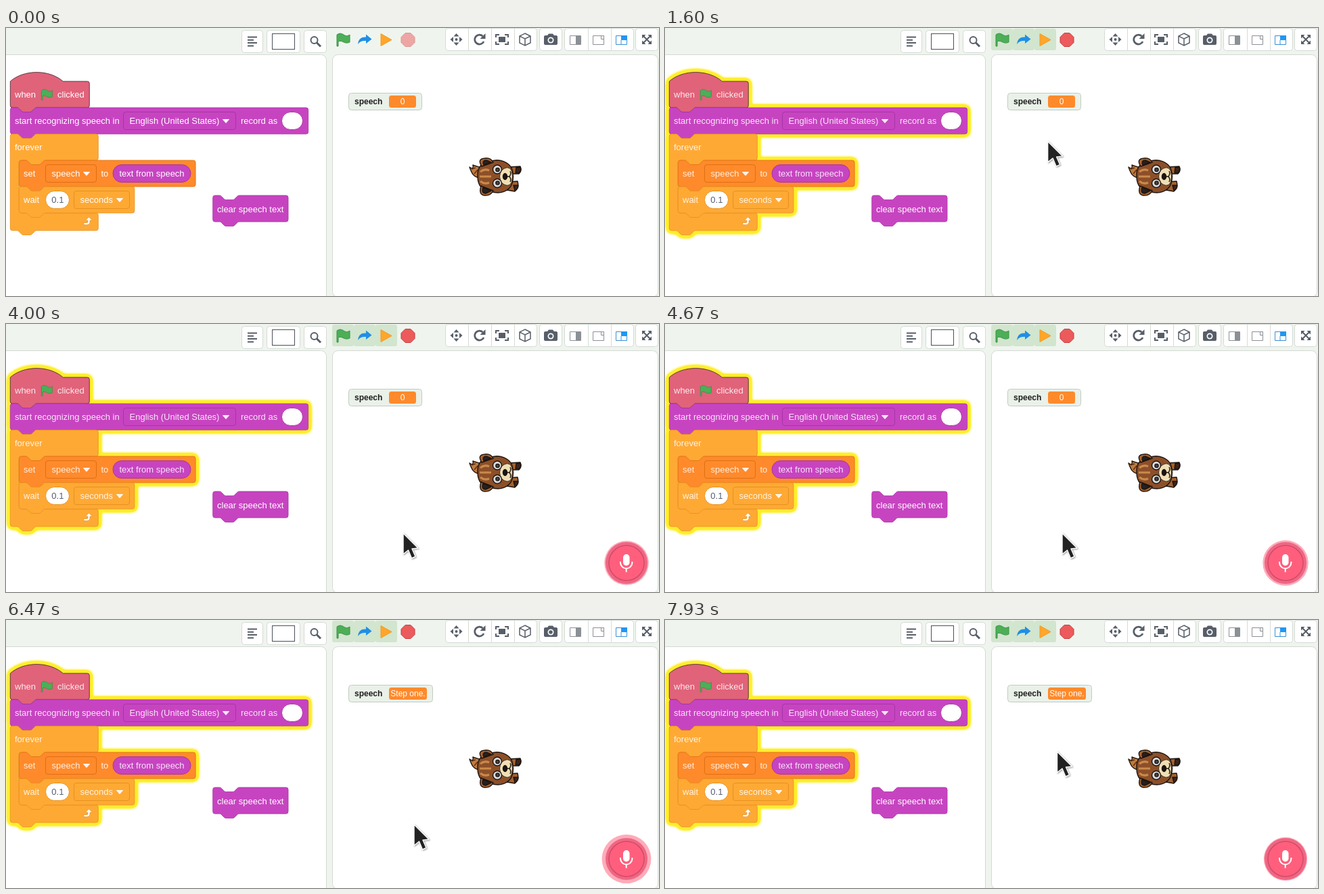
These frames come from a looping animation (965x397 px, 8000 ms). An HTML page:

```html
<!DOCTYPE html>
<html lang="en">
<head>
<meta charset="utf-8">
<title>Speech blocks</title>
<style>
html, body { margin: 0; width: 100%; height: 100%; overflow: hidden; background: #eff5ee; }
svg { display: block; font: 13px "Liberation Sans", Arial, sans-serif; }
.label { fill: #fff; }
.running { filter: url(#glow); }
.running .label { fill-opacity: .86; }
.btn { fill: #fff; stroke: #d5dbd5; }
.icon { fill: none; stroke: #575e68; stroke-width: 2; }
.solid { fill: #575e68; }
.ink { stroke: #1d1410; stroke-width: 1.4; stroke-linejoin: round; }
</style>
</head>
<body>
<svg width="965" height="397" viewBox="0 0 965 397">
  <defs>
    <filter id="glow" filterUnits="userSpaceOnUse" x="-10" y="50" width="480" height="270" color-interpolation-filters="sRGB">
      <feGaussianBlur in="SourceAlpha" stdDeviation="3.4"/>
      <feComponentTransfer result="halo"><feFuncA type="table" tableValues="0 1 1 1 1 1 1 1 1 1 1 1"/></feComponentTransfer>
      <feFlood flood-color="#ffee2b"/>
      <feComposite in2="halo" operator="in"/>
      <feMerge><feMergeNode/><feMergeNode in="SourceGraphic"/></feMerge>
    </filter>
    <path id="flag" d="M1 3C5 0 8 1 11 3S17 5 20 3V14C16 16 13 15 10 13.500S5 12 3 13V20H1Z" fill="#4caf57" stroke="#3c9147"/>
  </defs>

  <rect x="-10" y="39.500" width="483.500" height="380" rx="8" fill="#fff" stroke="#d3d9d3"/>
  <rect x="482.500" y="39.500" width="481" height="359" rx="8" fill="#fff" stroke="#d3d9d3"/>

  <g id="buttons"></g>
  <path class="icon" d="M357 13.500h14M357 17.800h9M357 22.100h14M357 26.400h9"/>
  <rect x="393.500" y="8.500" width="33" height="23" fill="#fff" stroke="#4a4f57"/>
  <circle class="icon" cx="455.500" cy="18" r="5" stroke-width="2.400"/>
  <path class="icon" d="M459 21.500l6 6" style="stroke-width:3"/>

  <g id="cells"></g>
  <use href="#flag" x="488" y="7"/>
  <path d="M520 24C521 16 525 13 532 13.500V9.500L540.500 16.500L532 23V19C526 18.500 523 20 520 24Z" fill="#1f8fe5"/>
  <path d="M554 8.500L570 17.500L554 26.500Z" fill="#ffa62b" stroke="#f39a20" stroke-linejoin="round"/>
  <path id="stop" d="M590 7.500h8l6 6v8l-6 6h-8l-6-6v-8z" fill="#ec5a5c" stroke="#c8393d"/>

  <g class="solid">
    <path d="M665.500 8l4 4.500h-8zM665.500 26l4-4.500h-8zM656.500 17l4.500-4v8zM674.500 17l-4.500-4v8z"/>
    <circle cx="665.500" cy="17" r="2"/>
    <path d="M708.500 8v8h-8z"/>
    <path d="M795 13q0-2 2-2h3l2-2.500h6l2 2.500h3q2 0 2 2v10q0 2-2 2h-16q-2 0-2-2z"/>
    <circle cx="805" cy="18" r="4.500" fill="#fff"/><circle cx="805" cy="18" r="2.800"/>
    <path d="M728 13h10v8h-10z"/>
    <path d="M940 10h5.500l-5.500 5.500zM954 10v5.500l-5.500-5.500zM940 24v-5.500l5.500 5.500zM954 24h-5.500l5.500-5.500z"/>
  </g>
  <g class="icon">
    <path d="M704.500 12A7 7 0 1 0 706 20" stroke-width="2.800"/>
    <path d="M724 14v-4h5M737 10h5v4M742 20v4h-5M729 24h-5v-4"/>
    <path d="M767 8l8 4v10l-8 4l-8-4v-10zM759 12l8 4l8-4M767 16v10" style="stroke-width:1.500"/>
    <path d="M941 11l12 12M953 11l-12 12"/>
  </g>
  <g fill="#fff" stroke="#8b9096">
    <path d="M833.500 11.500h16v13h-16zM867.500 11.500h16v13h-16z"/>
    <path d="M842 12h7.500v12h-7.500z" fill="#8b9096" stroke="none"/>
    <path d="M879.500 11.500h4v5h-4z"/>
    <path d="M901.500 11.500h16v13h-16z" stroke="#3b8fd6"/>
    <path d="M909 11h9v7h-9z" fill="#2196f3" stroke="none"/>
    <path d="M909 18v6" stroke="#3b8fd6"/>
  </g>

  <g id="stack"></g>
  <g id="loose"></g>

  <rect id="monitor" x="506.500" y="96.500" height="25" rx="4" fill="#e9f1e8" stroke="#c3cbc3"/>
  <text x="515" y="113" font-size="12" font-weight="bold" fill="#1e1e1e">speech</text>
  <rect id="slot" x="566" y="100" height="18" rx="3.500" fill="#ff8a2b"/>
  <text id="value" y="113.300" font-size="12" text-anchor="middle" fill="#fff"></text>

  <g id="animal" class="ink">
    <path d="M702 222C690 222 688 214 685 206C689 209 691 208 690 203C696 206 701 204 706 211Z" fill="#c07a3c"/>
    <path d="M688 209l6-2M692 216l5-6" fill="none" stroke="#5b2e14"/>
    <path d="M742 206L760 205Q763 211 758 216L744 216ZM742 228L756 227Q759 236 752 242L740 240Z" fill="#a5622f"/>
    <path d="M754 206.500h6q2 4-2 8h-5zM750 233h7q0 6-5 8z" fill="#3b241a"/>
    <path d="M697 220C696 206 704 198 716 198C728 192 745 199 748 210Q751 220 748 230C744 242 730 247 716 242C704 242 697 233 697 220Z" fill="#8d4f28"/>
    <path d="M703 205Q696 194 707 193Q716 191 720 199ZM702 234Q698 247 707 248Q716 249 720 241Z" fill="#a5622f"/>
    <path d="M706 203Q703 196 710 196L717 199ZM705 236Q702 245 709 245L717 241Z" fill="#262020"/>
    <path d="M701 213Q707 208 714 211M700 220H717M701 227Q707 232 714 229" fill="none" stroke="#c98a4c" stroke-width="3"/>
    <path d="M731 212Q742 202 747 211Q750 220 747 229Q742 238 731 228Q728 220 731 212Z" fill="#f0dfb4" stroke-width=".8"/>
    <circle cx="726" cy="209.500" r="6.500" fill="#d9dadb"/><circle cx="726" cy="230" r="6.500" fill="#d9dadb"/>
    <circle cx="726.500" cy="210" r="2.600" fill="#474747"/><circle cx="726.500" cy="229.500" r="2.600" fill="#474747"/>
    <ellipse cx="737.500" cy="220" rx="3" ry="4.500" fill="#1d1614"/>
    <path d="M741 220h3q3-4 1-8M744 220q3 4 1 8" fill="none"/>
  </g>

  <g id="mic">
    <circle id="pulse" cx="917" cy="354" fill="#ffabb9"/>
    <circle cx="917" cy="354" r="31" fill="#ee6783"/>
    <circle cx="917" cy="354" r="26" fill="#ff5f7d" stroke="#d44a69" stroke-width="1.500"/>
    <rect x="912" y="341" width="9.500" height="17" rx="4.700" fill="#fff"/>
    <path d="M908 352v1.500a8.700 8.700 0 0 0 17.400 0V352M916.700 362.500v5" fill="none" stroke="#fff" stroke-width="2"/>
  </g>

  <g id="cursor">
    <path id="arrow" d="M0 0V31L7.500 25L12.500 37L18 34.500L13 23L22 22Z" fill="#222" stroke="#fff" stroke-width="1.400" stroke-linejoin="round" style="filter:drop-shadow(1px 1px 1px #0006)"/>
    <path id="hand" d="M-3.500 3.500q0-3.500 3.500-3.500t3.500 3.500v8q1-1.500 4-1q2.500.500 3 2q2-.700 4 .500q1 .700 1.200 2q3-.500 4.300 2v5q0 4-2.500 6v3.500h-15.500v-3q-3-2-6-6.500q-2-3.500-6-6.500q-1-3.500 2.500-3.800q2 .300 4 2.300z" fill="#fff" stroke="#111" stroke-width="2.200" stroke-linejoin="round"/>
  </g>
</svg>

<script>
const $ = id => document.getElementById(id);
const PURPLE = ['#c744c1', '#a834a3'], AMBER = ['#ffa935', '#e5921f'],
      ORANGE = ['#ff8a2b', '#dd7010'], RED = ['#e0637a', '#3b2a2e'];

// Toolbar buttons: left edge, top, width, number of segments
$('buttons').innerHTML = [[348.5, 3.5, 31, 1], [385.5, 3.5, 49, 1], [440.5, 3.5, 33, 1],
  [649.5, .5, 135, 4], [788.5, .5, 33, 1], [825.5, .5, 102, 3], [930.5, .5, 33, 1]]
  .map(([x, y, w, n]) => {
    let out = `<rect class="btn" x="${x}" y="${y}" width="${w}" height="33" rx="4"/>`;
    for (let i = 1; i < n; i++) out += `<path class="btn" d="M${Math.round(x + w * i / n) + .5} ${y}v33"/>`;
    return out;
  }).join('');

$('cells').innerHTML = [0, 1, 2, 3].map(i =>
  `<rect x="${482 + 32 * i}" y="1" width="32" height="32" rx="3"/>`).join('');

// Block outlines, in block units
const notch = 'c2 0 3 1 4 2l4 4c1 1 2 2 4 2h12c2 0 3-1 4-2l4-4c1-1 2-2 4-2';
const tab = 'c-2 0-3 1-4 2l-4 4c-1 1-2 2-4 2h-12c-2 0-3-1-4-2l-4-4c-1-1-2-2-4-2';
const turn = 'a4 4 0 0 1 4 4', back = 'a4 4 0 0 1-4 4';
const top_ = w => `M0 4a4 4 0 0 1 4-4H12${notch}H${w - 4}${turn}`;
const bottom = `${back}H48${tab}H4a4 4 0 0 1-4-4z`;
const plain = w => `${top_(w)}v40${bottom}`;
const hat = `M0 0c25-22 71-22 96 0H140${turn}v40${bottom}`;
const loop = `${top_(160)}v40${back}H64${tab}H20a4 4 0 0 0-4 4v88a4 4 0 0 0 4 4H28${notch}H156${turn}v24${bottom}`;

const block = (x, y, d, [fill, edge]) =>
  `<path transform="translate(${6.3 + x * .8125} ${79 + y * .8125}) scale(.8125)" d="${d}" fill="${fill}" stroke="${edge}"/>`;
const label = (x, y, s, fill) => `<text x="${x}" y="${y}" ${fill ? `fill="${fill}"` : 'class="label"'}>${s}</text>`;
const box = (x, y, w, [fill, edge], r = 13) =>
  `<rect x="${x}" y="${y}" width="${w}" height="26" rx="${r}" fill="${fill}" stroke="${edge}"/>`;
const menu = (x, y, w, s, color) => box(x, y, w, color, 3.5) + label(x + 9, y + 17.6, s) +
  `<path class="label" d="M${x + w - 19} ${y + 11}h9l-4.500 5z" stroke="#fff" stroke-linejoin="round"/>`;

$('stack').innerHTML =
  block(0, 0, hat, RED) + block(0, 48, plain(542), PURPLE) + block(0, 96, loop, AMBER) +
  block(16, 144, plain(321), ORANGE) + block(16, 192, plain(210), AMBER) +
  label(13, 103, 'when') + label(76, 103, 'clicked') +
  '<use href="#flag" transform="translate(51.500 90) scale(.84)"/>' +
  label(13, 142, 'start recognizing speech in') + menu(173.5, 124.5, 166, 'English (United States)', PURPLE) +
  label(347, 142, 'record as') + box(407.5, 124.5, 31, ['#fff', PURPLE[1]]) +
  label(13, 181, 'forever') +
  label(26, 220, 'set') + menu(58.5, 202.5, 75, 'speech', ORANGE) + label(140.5, 220, 'to') +
  box(158, 202.5, 115, PURPLE) + label(167.5, 220, 'text from speech') +
  label(26, 259, 'wait') + box(58.5, 241.5, 35, ['#fff', AMBER[1]]) + label(67.3, 259, '0.1', '#575e75') +
  menu(100.5, 241.5, 82, 'seconds', AMBER) +
  '<path d="M115 291.500h5q4 0 4-4v-2.500h3.500l-5-5l-5 5h3.500v2q0 1.500-1.500 1.500h-4.500z" fill="#fff" stroke="#d58a22" stroke-width=".6"/>';

$('loose').innerHTML = block(368.5, 208, plain(137), PURPLE) + label(312, 273, 'clear speech text');

// Pointer track: time, x, y
const track = [[265, 411, 60], [400, 475, 40], [560, 558, 22], [730, 535, 18], [930, 503.5, 14.5],
  [1200, 503.5, 14.5], [1400, 558, 117], [1534, 558, 117], [1730, 587, 310], [6300, 587, 310],
  [6460, 603, 303], [7300, 603, 303], [7700, 579.5, 195]];

function pointer(t) {
  const i = track.findIndex(k => k[0] > t);
  if (i < 0) return track[track.length - 1].slice(1);
  const [t0, x0, y0] = track[Math.max(i - 1, 0)], [t1, x1, y1] = track[i];
  const p = Math.max(0, (t - t0) / (t1 - t0)), e = p * p * (3 - 2 * p);
  return [x0 + (x1 - x0) * e, y0 + (y1 - y0) * e];
}

const show = (id, on) => $(id).style.display = on ? '' : 'none';

function draw(now) {
  const t = Math.floor((now % 8000 + 4) * .015) / .015;
  const running = t >= 1199, heard = t >= 5860;
  const [x, y] = pointer(t);
  const cell = t > 260 && y < 34 ? Math.floor((x - 482) / 32) : -1;

  $('stack').setAttribute('class', running ? 'running' : '');
  [...$('cells').children].forEach((c, i) =>
    c.setAttribute('fill', running && i < 3 ? '#d2e5ce' : i === cell ? '#cfe6ee' : 'none'));
  $('stop').setAttribute('opacity', running ? 1 : .5);

  $('monitor').setAttribute('width', heard ? 124 : 108);
  $('slot').setAttribute('width', heard ? 56 : 40);
  $('value').setAttribute('x', heard ? 594 : 586);
  $('value').textContent = heard ? 'Step one.' : '0';

  show('mic', t >= 2866);
  $('pulse').setAttribute('r', 32 + 2.4 * (1 - Math.cos((t - 2867) / 1000 * 2 * Math.PI)));

  const pointing = cell >= 0 && cell < 4;
  show('cursor', t > 260);
  show('hand', pointing);
  show('arrow', !pointing);
  $('cursor').setAttribute('transform', `translate(${x} ${y})`);
}

const start = performance.now();
(function frame() {
  draw(performance.now() - start);
  requestAnimationFrame(frame);
})();
</script>
</body>
</html>
```
